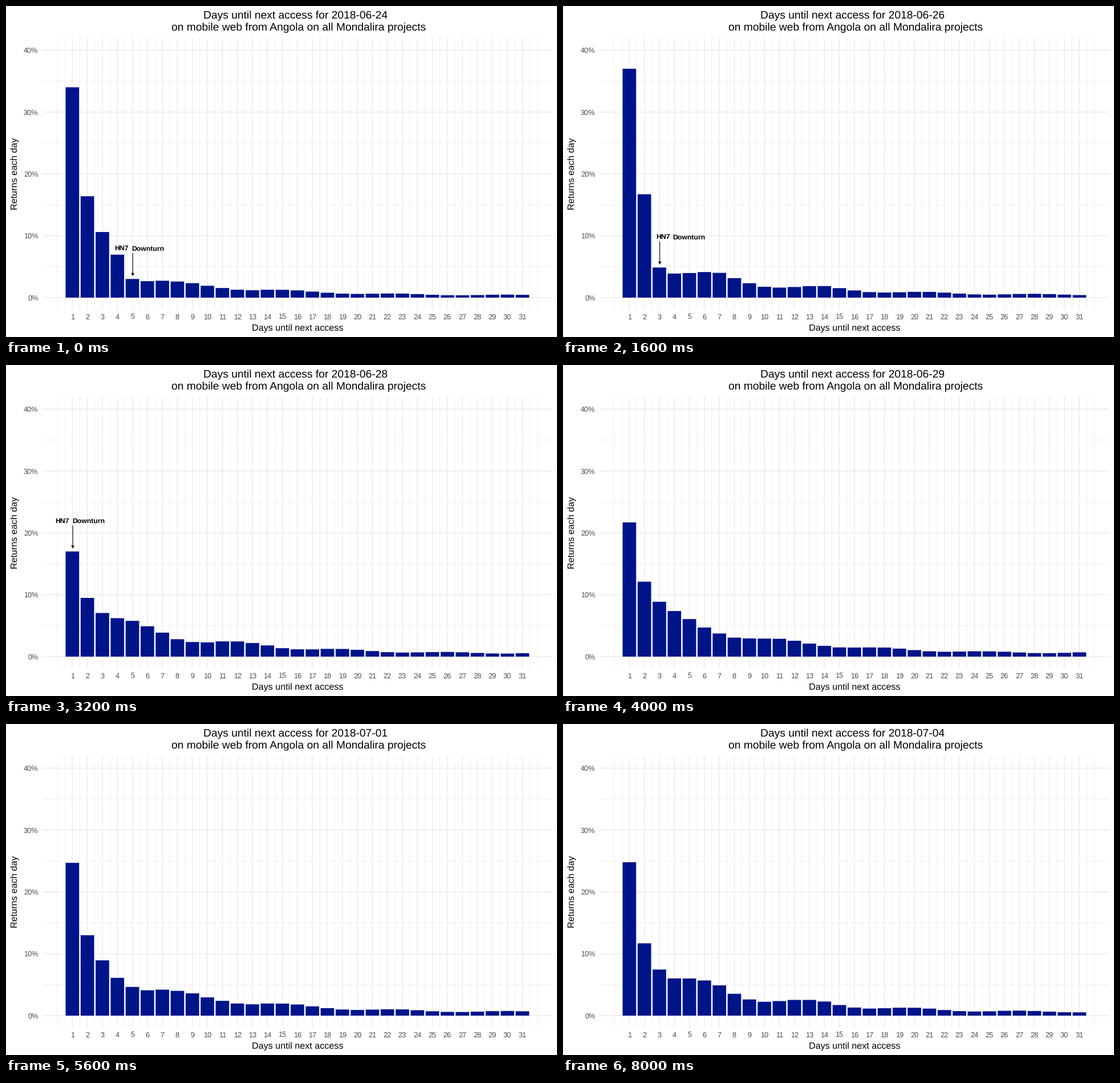
Animation of 966x580 px, one loop 8.8 s. Source, as a matplotlib script:

```python
import numpy as np
import matplotlib.pyplot as plt
from matplotlib.animation import FuncAnimation
from matplotlib.patches import Polygon, Rectangle

W, H, DPI = 966, 580, 100
PT = 72 / DPI
LEFT, RIGHT, TOP, BOTTOM = 64, 958, 56, 532
ZERO, PER_PCT = 511, 10.84
X1, STEP = 116.35, 26.3
NAVY, GRID, GREY = "#00148a", "#ebebeb", "#4d4d4d"
DAYS, STEPS = 31, 11
CUT = 5  # date of the downturn, counted from 24 June (a Sunday)

# Return curve (%) by days waited, and first-day return by start date
WAIT = [1, 2, 4, 7, 10, 14, 17, 21, 25, 31]
RETURN = [24.3, 12.3, 6.3, 4.4, 2.65, 2.05, 1.35, 1.02, .73, .63]
START = [0, 2, 3, 4, 5, 7, 10]
FIRST = [34, 37, 38.2, 17, 21.7, 24.7, 24.8]
LABEL_DX = [-31, -31, -6, -6, -30]

plt.rcParams["font.family"] = ["Liberation Sans"]
plt.rcParams["text.hinting"] = "none"


def rate(k, d):
    """Share of visitors from date k who come back after d days."""
    date = k + d
    first = np.interp(k, START, FIRST)
    if d == 1:
        return first
    base = np.exp(np.interp(np.log(d), np.log(WAIT), np.log(RETURN)))
    swing = .17 * min(1, (d - 1) / 3)
    week = 1 + swing * np.cos(2 * np.pi * (date - 2.05) / 7)
    if k >= CUT:
        level = 1
    elif date < CUT:
        level = first / RETURN[0] * d ** -.15
    else:
        level = .65 + .065 * k * (1 - np.exp(CUT - date))
    return base * week * level


def day_x(d):
    return X1 + (d - 1) * STEP


def pct_y(p):
    return ZERO - p * PER_PCT


fig = plt.figure(figsize=(W / DPI, H / DPI), dpi=DPI, facecolor="white")
ax = fig.add_axes([0, 0, 1, 1])
ax.set_xlim(0, W)
ax.set_ylim(H, 0)
ax.axis("off")


def line(xs, ys, px, color=GRID, z=1):
    return ax.plot(xs, ys, color=color, lw=px * PT, zorder=z, snap=False,
                   solid_capstyle="butt")[0]


def text(x, y, s, px, color="black", ha="center", **kw):
    return ax.text(x, y, s, fontsize=px * PT, color=color, ha=ha,
                   va="baseline", zorder=5, **kw)


for p in range(5, 40, 10):
    line([LEFT, RIGHT], [pct_y(p)] * 2, .75)
for d in [0, DAYS + 1] + [i + .5 for i in range(DAYS + 1)]:
    line([day_x(d)] * 2, [TOP, BOTTOM], .75)
for p in range(0, 50, 10):
    line([LEFT, RIGHT], [pct_y(p)] * 2, 1.5)
    text(56.5, pct_y(p) + 4.6, f"{p}%", 12.8, GREY, "right")
for d in range(1, DAYS + 1):
    line([day_x(d)] * 2, [TOP, BOTTOM], 1.5)
    text(day_x(d), 549.3, str(d), 12.8, GREY)

text(511, 569, "Days until next access", 16.1)
text(19.5, 294, "Returns each day", 16.1, rotation=90,
     rotation_mode="anchor")
title = text(508, 22, "", 19.3)
text(513, 43, "on mobile web from Angola on all Mondalira projects", 19.3)

bars = [ax.add_patch(Rectangle((day_x(d) - .45 * STEP, ZERO), .9 * STEP, 0,
                               fc=NAVY, lw=0, zorder=3, snap=False))
        for d in range(1, DAYS + 1)]

words = [text(0, 0, s, 12.2, ha="left", weight="bold")
         for s in ("HN7", "Downturn")]
shaft = line([0, 0], [0, 0], 1.1, "black", 4)
tip = ax.add_patch(Polygon([[0, 0]] * 3, fc="black", lw=0, zorder=4))
note = [*words, shaft, tip]


def place_note(k):
    d = CUT - k
    x, top = day_x(d) + .7, pct_y(rate(k, d))
    left, y = day_x(d) + LABEL_DX[k], top - 5
    words[0].set_position((left, top - 50))
    words[1].set_position((left + 29.5, top - 49.5))
    shaft.set_data([x, x], [top - 45.5, y - 4])
    tip.set_xy([(x, y), (x - 2.8, y - 5.5), (x + 2.8, y - 5.5)])


def draw(k):
    day = 24 + k
    date = f"06-{day:02d}" if day <= 30 else f"07-{day - 30:02d}"
    title.set_text(f"Days until next access for 2018-{date}")
    for d, bar in enumerate(bars, 1):
        p = rate(k, d)
        bar.set_y(pct_y(p))
        bar.set_height(p * PER_PCT)
    shown = k < CUT
    for artist in note:
        artist.set_visible(shown)
    if shown:
        place_note(k)
    return [title, *bars, *note]


anim = FuncAnimation(fig, draw, frames=STEPS, interval=800, repeat=True,
                     repeat_delay=0, blit=False)
plt.show()
```
